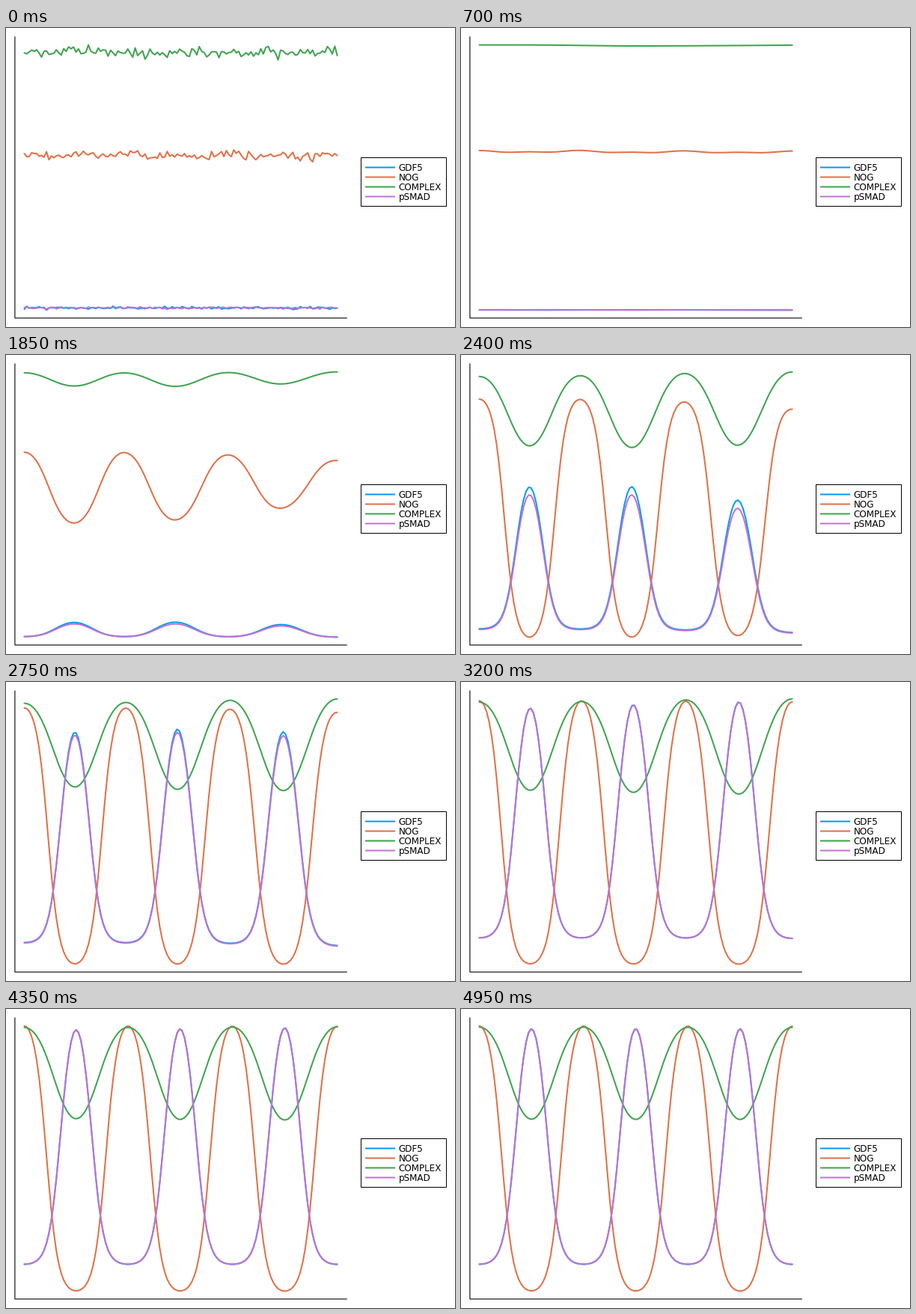
A matplotlib script that plays this animation: 600 by 400 pixels, repeating every 5.05 s.

```python
import numpy as np
import matplotlib.pyplot as plt
from matplotlib.animation import FuncAnimation
from matplotlib.patches import Rectangle

W, H, DPI = 600, 400, 100
PX = 72 / DPI
TICKS, TICK_MS = 101, 50
X0, X1, TOP, BOTTOM = 24.45, 442.65, 22.6, 377.4
POINTS, LAST = 128, 85

t = np.linspace(0, 1, POINTS)
x = X0 + (X1 - X0) * t
# The pattern forms later towards the right
delay = 2 * t**3


def sigmoid(v):
    return 1 / (1 + np.exp(-v))


def growth(start, end, rate, half):
    """Level that moves from start to end along a logistic curve."""
    return lambda n: start + (end - start) * sigmoid(rate * (n - half))


# Levels at the NOG crests and at the NOG valleys
gdf_levels = growth(377.4, 341.8, 0.3, 42.1), growth(377.4, 26.5, 0.311, 39.7)
nog_levels = growth(165, 22.6, 0.225, 35.9), growth(165, 377.4, 0.5, 32.9)
cplx_levels = growth(22.6, 25, 0.307, 36.5), growth(22.6, 148.5, 0.307, 36.5)
maturity = growth(0, 1, 0.307, 36.5)


def drift(n):
    """Sideways shift of the pattern in pixels, gone at the end."""
    return 7 * np.clip((LAST - n) / 54, 0, 1)**1.3


def step(s, steepness, middle):
    """Sigmoid rescaled to run from 0 to 1 as s does."""
    low, high, value = (sigmoid(steepness * (v - middle)) for v in (0, 1, s))
    return (value - low) / (high - low)


def wave(levels, n, s, steepness, middle, crest_shift=0, valley_shift=0):
    crest, valley = (level(n - delay) for level in levels)
    # Stretched parts of the pattern reach further
    stretch = drift(n) / 3.5 * np.cos(np.pi * t) * maturity(n)
    crest = crest + crest_shift * stretch
    valley = valley + valley_shift * stretch
    return crest + (valley - crest) * step(s, steepness, middle)


def noise(n, size, spread, seed):
    """Seeded noise whose cosine modes are damped as diffusion does."""
    values = np.random.default_rng(seed).normal(0, size, POINTS)
    k = np.arange(POINTS)
    modes = np.cos(np.pi * np.outer(k, k + 0.5) / POINTS)
    weight = 2 * (modes @ values) / POINTS
    weight[0] /= 2
    return (weight * np.exp(-spread * k**2 * n)) @ modes


def state(n):
    u = 6 * (t + drift(n) / (X1 - X0) * np.sin(np.pi * t))
    s = (1 - np.cos(np.pi * u)) / 2
    steep = np.interp(n, [25, 41], [1, 5])
    gdf_middle = np.interp(n, [41, 55], [1.02, 0.94])
    nog_middle = np.interp(n, [41, 55], [0.5, 0.35])
    ripple = 1.2 * np.exp(-n / 20) * (np.cos(np.pi * u) + np.cos(2 * np.pi * u))

    def gdf(when):
        return wave(gdf_levels, when, s, steep, gdf_middle, valley_shift=6)

    rows = np.array([
        gdf(n) + noise(n, 0.9, 0.002, 3),
        wave(nog_levels, n, s, steep, nog_middle) - ripple + noise(n, 3.2, 0.008, 11),
        wave(cplx_levels, n, s, 0.4 * steep, 0.8, 2.6, -3) + noise(n, 4.4, 0.008, 7),
        # pSMAD follows GDF5 with a short lag
        gdf(n - 0.4) + noise(n, 0.8, 0.002, 5),
    ])
    low, high = rows.min(), rows.max()
    return TOP + (rows - low) * (BOTTOM - TOP) / (high - low)


fig = plt.figure(figsize=(W / DPI, H / DPI), dpi=DPI, facecolor="white")
ax = fig.add_axes([0, 0, 1, 1])
ax.set_xlim(0, W)
ax.set_ylim(H, 0)
ax.axis("off")

ax.plot([11.9, 11.9, 455.2], [11.9, 388, 388], color="black", lw=1.1 * PX,
        snap=False, solid_joinstyle="miter")
ax.add_patch(Rectangle((474.5, 173.5), 114, 65, fc="white", ec="black",
                       lw=PX, snap=False))

SERIES = [("GDF5", "#009AF9"), ("NOG", "#E26F46"),
          ("COMPLEX", "#3DA44D"), ("pSMAD", "#C271D2")]
lines = []
for i, (name, color) in enumerate(SERIES):
    y = 186.5 + 13 * i
    style = dict(color=color, lw=2 * PX, snap=False)
    ax.plot([480, 520], [y, y], solid_capstyle="butt", **style)
    ax.text(524.5, y + 4.4, name, fontsize=12 * PX, family="DejaVu Sans",
            va="baseline", color="black")
    lines += ax.plot([], [], solid_capstyle="round", solid_joinstyle="round", **style)


def draw(tick):
    # About every seventh tick holds the picture
    n = tick - (tick + 6 - (tick > 50)) // 7
    for line, y in zip(lines, state(n)):
        line.set_data(x, y)
    return lines


anim = FuncAnimation(fig, draw, frames=TICKS, interval=TICK_MS,
                     repeat=True, repeat_delay=0, blit=False)
plt.show()
```
